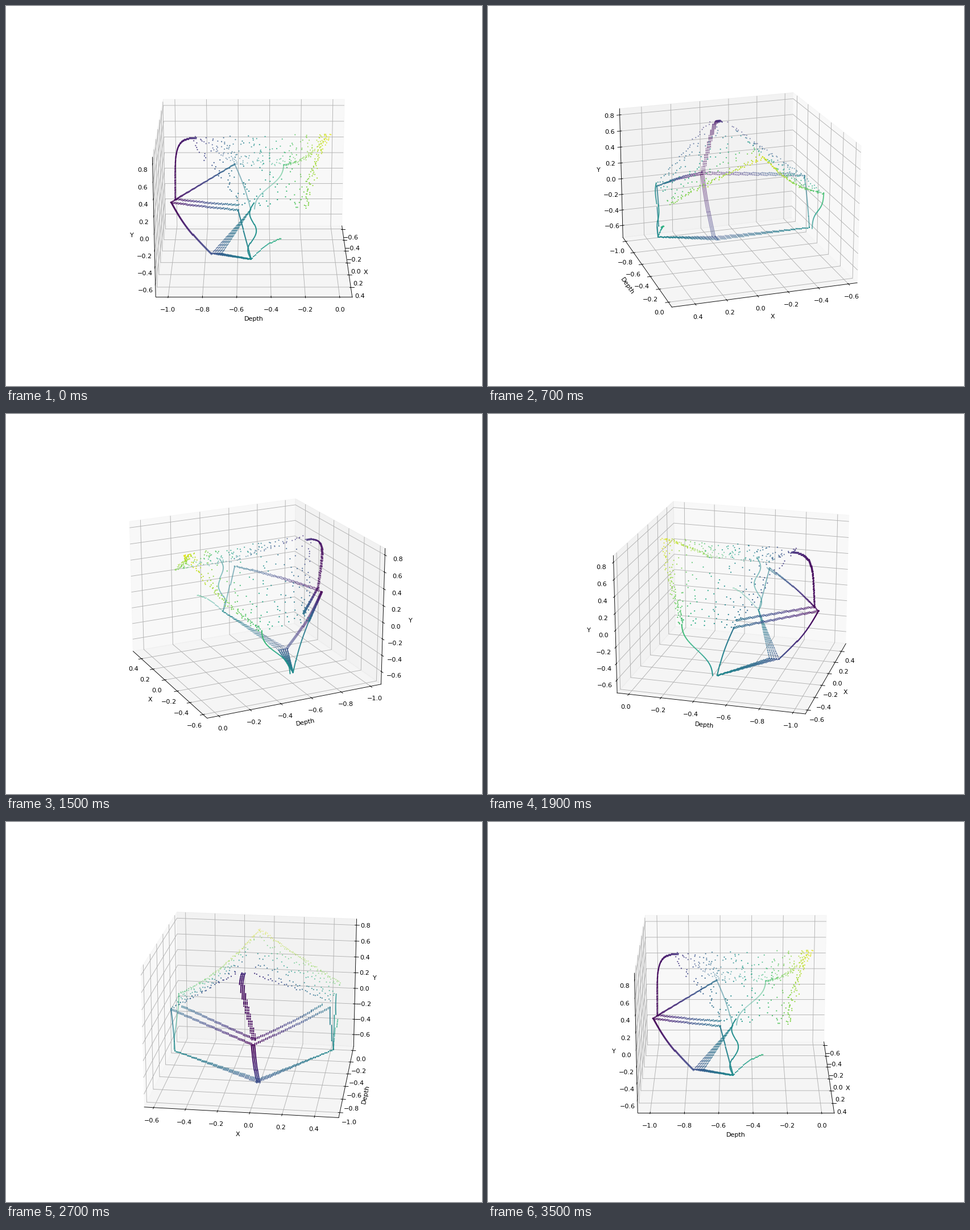
A matplotlib script that plays this animation: 837 by 669 pixels, repeating every 3600 ms.

```python
import numpy as np
import matplotlib.pyplot as plt
from matplotlib.animation import FuncAnimation
from matplotlib.ticker import MultipleLocator

FRAMES, INTERVAL, DPI = 36, 100, 80
PITCH = 0.01
rng = np.random.default_rng(4)
cloud = []


def vec(*xyz):
    """A point as (X, depth, Y)."""
    return np.array(xyz, float)


def line(a, b, bend=(0, 0, 0), waves=1, n=None):
    """Points from a to b, pushed sideways by a sine of half-waves."""
    n = n or int(np.abs(b - a).max() / PITCH) + 2
    f = np.linspace(0, 1, n)[:, None]
    return a + (b - a) * f + vec(*bend) * np.sin(waves * np.pi * f)


def add(pts, offset=(0, 0, 0), rough=0.0):
    """Store points with X and Y snapped to the pixel pitch."""
    pts = pts + vec(*offset) + rng.normal(0, rough, pts.shape) * (0.2, 1, 0.2)
    pts[:, ::2] = np.round(pts[:, ::2] / PITCH) * PITCH
    cloud.append(pts)


def beam(a, b, bend=(0, 0, 0)):
    for side in (-1, 1):
        add(line(a, b, bend), (0, 0.003 * side, 0.005 * side))


def post(pts):
    for side in (-1, 0, 1):
        add(pts, (PITCH * side, 0, 0))


def fan(a, b, rows=5, spread=0.015):
    for k in range(rows):
        add(line(a + (0, k * spread, 0), b))


def curl(a, b):
    """Rise straight from a, then lean over in depth towards b."""
    n = int((b - a)[2] / PITCH)
    t = np.linspace(0, np.pi / 2, n)[:, None]
    rise, lean = np.sin(t), (1 - np.cos(t)) ** 2.5
    return a + (b - a) * np.hstack([rise, lean, rise])


def veil(front, back, rays=30, dots=5):
    """Sparse points bridging two edges, each given as line() arguments."""
    a, b = line(*front, n=rays), line(*back, n=rays)
    for k in range(dots):
        f = (k + rng.uniform(0, 0.9, (rays, 1))) / dots
        add(a + (b - a) * np.sin(np.pi / 2 * f) ** 2, rough=0.006)
    add(line(*back), rough=0.012)


hub, foot = vec(0.01, -1, 0), vec(0.015, -0.975, 0.042)
top, base = vec(-0.075, -0.847, 0.733), vec(0.005, -0.76, -0.642)
near, far = vec(0.46, -0.516, -0.373), vec(-0.574, -0.521, -0.483)
near_top, far_top = vec(0.435, -0.592, 0.198), vec(-0.566, -0.623, 0.108)
peak = vec(-0.077, -0.05, 0.773)
near_eave, far_eave = vec(0.469, -0.204, 0.245), vec(-0.577, -0.31, 0.088)

# Middle upright and the beams leaving it
post(curl(foot, top))
post(line(hub, base, (0, -0.022, 0)))
beam(foot, vec(0.393, -0.59, 0.223), (0, -0.02, 0))
beam(hub, near_top, (0, -0.02, 0))
beam(foot, vec(-0.497, -0.62, 0.149))
beam(hub, far_top)
fan(base, near)
fan(base, far)

# Side posts and loose edges
add(line(near_top, near))
add(line(vec(0.468, -0.5, 0.3), near, (0, -0.022, 0), waves=3))
add(line(near, vec(0.468, -0.344, -0.117), (0, 0, 0.035)))
add(line(far_top, far, (0, 0.01, 0)))
add(line(vec(-0.577, -0.496, -0.48), far_eave, (0, -0.025, 0), waves=2))

# Two slopes meeting at the ridge
veil((vec(0, -0.88, 0.735), vec(0.44, -0.57, 0.26)),
     (peak, near_eave, (0, -0.02, 0)))
veil((vec(-0.12, -0.85, 0.715), far_top),
     (peak, far_eave, (0, 0, -0.09)))

x, depth, y = np.vstack(cloud).T

fig = plt.figure(figsize=(837 / DPI, 669 / DPI), dpi=DPI)
ax = fig.add_subplot(projection="3d")
ax.scatter(x, depth, y, c=depth, cmap="viridis", vmin=-1, vmax=0, s=1)
ax.set(xlim=(-0.659, 0.5477), ylim=(-1.0729, 0.0729), zlim=(-0.756, 0.8773),
       xlabel="X", ylabel="Depth", zlabel="Y")
for axis in (ax.xaxis, ax.yaxis, ax.zaxis):
    axis.set_major_locator(MultipleLocator(0.2))


def update(i):
    ax.view_init(elev=20, azim=360 * i / (FRAMES - 1))
    return ()


anim = FuncAnimation(fig, update, frames=FRAMES, interval=INTERVAL,
                     init_func=lambda: update(0), repeat=True, repeat_delay=0)
plt.show()
```
